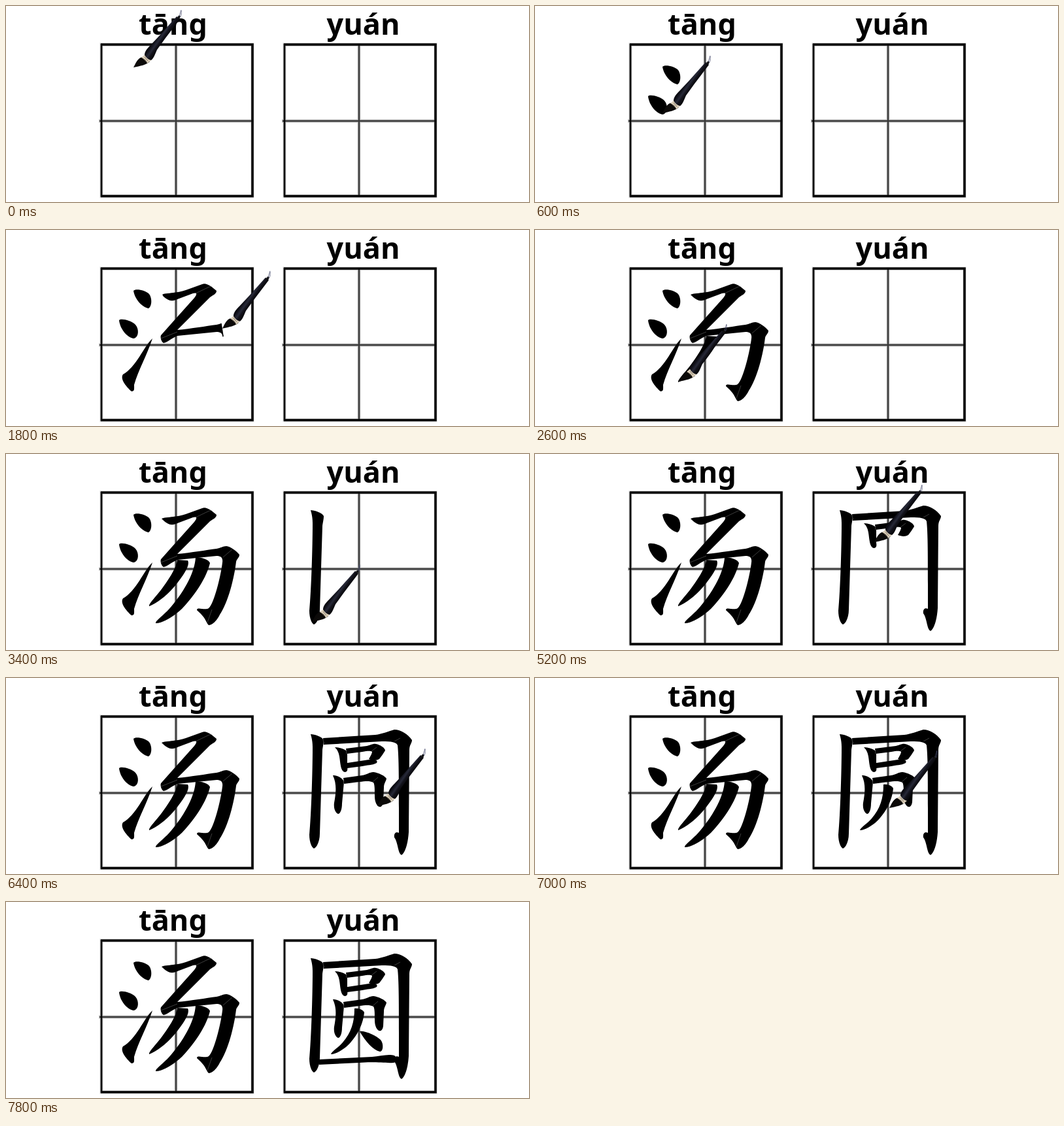
These frames come from a looping animation (800 by 300 pixels, 8000 ms). An HTML page:

```html
<!DOCTYPE html>
<html lang="zh">
<head>
<meta charset="utf-8">
<title>Stroke order</title>
<style>
  html, body { margin: 0; width: 100%; height: 100%; overflow: hidden; background: #fff; }
  svg { display: block; width: 800px; height: 300px; }
  text { font: 600 45px "Noto Sans", "Open Sans", sans-serif; text-anchor: middle; }
</style>
</head>
<body>
<svg viewBox="0 0 800 300">
  <defs>
    <mask id="reveal" maskUnits="userSpaceOnUse" x="0" y="0" width="800" height="300">
      <path id="guide" pathLength="1" fill="none" stroke="#fff" stroke-width="25"/>
    </mask>
    <linearGradient id="lacquer" gradientUnits="userSpaceOnUse" x1="36" y1="-46" x2="46" y2="-39">
      <stop offset="0" stop-color="#0b0b12"/>
      <stop offset=".4" stop-color="#272938"/>
      <stop offset=".65" stop-color="#12121a"/>
      <stop offset="1" stop-color="#08080c"/>
    </linearGradient>
    <g id="grid" fill="none" stroke="#000">
      <path d="M260 59V291M142 176H377M146 59H377V291H146Z" stroke-opacity=".25" stroke-width="4.8"/>
      <path d="M260 59V291M143 176H377" stroke-opacity=".7" stroke-width="2.4"/>
      <path d="M146 58V292" stroke-width="2.6"/>
      <path d="M145 59H377V291H145" stroke-width="3.5"/>
    </g>
  </defs>
  <use href="#grid"/>
  <use href="#grid" x="280"/>
  <text x="255.5" y="44">tāng</text>
  <text x="546.5" y="44">yuán</text>
  <g id="ink"></g>
  <g id="brush">
    <path d="M0 0C3-5 5-12 11-15L19-17L25-9C20-4 10-2 0 0Z" fill="#0c0a09"/>
    <path d="M12-15L18-20L27-11L21-6C20-10 17-13 12-15Z" fill="#d9cdb8"/>
    <path d="M14-14L19-9M17-16L22-10" stroke="#6d5f4e" stroke-width=".8"/>
    <path d="M17-19C17-25 22-30 26-34L41-50L66-78L71-74L49-45L36-27C33-20 31-14 27-11C23-12 19-15 17-19Z" fill="url(#lacquer)"/>
    <path d="M67-77L70-80L72-78L70-74Z" fill="#111"/>
    <path d="M70-78L73-88M71-77C74-80 73-84 73-87" fill="none" stroke="#4a4f70" stroke-width=".8"/>
  </g>
</svg>
<script>
const STEP = 200;
const LOOP = 8000;

// Each stroke: outline, path of the brush tip, progress at each step, optional seams.
const strokes = [
  // tāng
  { d: "M195 93C198 89 213 92 219 98C224 105 223 117 218 120C208 118 197 106 195 93Z",
    guide: "M195 94L217 118", stops: [0, 1] },
  { d: "M173 138C176 135 191 138 198 145C204 152 203 165 195 166C184 164 174 150 173 138Z",
    guide: "M174 139L195 164", stops: [0, 1] },
  { d: "M224 166C211 178 199 210 179 221C174 228 184 240 192 247C197 247 196 243 196 237C202 215 216 191 224 166Z",
    guide: "M186 242L224 166", stops: [0, .6] },
  { d: "M238 99C243 96 262 97 275 92L300 83C306 80 314 86 322 93C322 98 317 99 312 103L262 153C284 151 306 147 322 145C328 144 332 141 337 141C344 142 352 148 357 154C357 159 353 160 352 165C349 190 340 227 327 246C322 256 315 262 310 262C305 257 307 252 292 239C292 233 304 240 310 236C318 230 329 185 331 166C332 159 329 156 322 156L262 162C254 165 247 172 241 173C237 171 235 162 238 160L288 104C293 98 292 95 286 97L262 106C254 110 248 109 238 99Z",
    guide: "M240 102L312 90L240 165L342 149L314 255L297 238", stops: [0, .17, .42, .65, .8, 1],
    seams: "M290 97L313 86M237 166L262 156M332 158L346 146M308 258L315 238" },
  { d: "M262 162L278 163C282 170 272 185 260 200C248 215 232 228 219 233C218 229 230 218 240 204C252 188 261 172 262 162Z",
    guide: "M268 163Q255 200 220 232", stops: [0, 1] },
  { d: "M290 158C300 158 311 162 312 167C307 188 291 214 269 237C256 249 240 259 229 259C228 255 242 247 254 232C274 208 289 180 290 158Z",
    guide: "M300 162Q280 220 229 258", stops: [0, 1] },
  // yuán: outer frame
  { d: "M466 86C472 86 484 90 486 95C486 100 485 103 484 110L480 238C480 249 476 259 471 261C466 258 464 248 464 240C467 210 469 140 469 108C469 98 468 93 466 86Z",
    guide: "M469 90L468 257", stops: [0, 1] },
  { d: "M485 92L565 87C575 86 586 81 594 79C604 79 615 86 621 95C621 100 617 102 617 110L616 236C615 252 611 267 605 271C599 268 600 252 594 244C593 237 597 235 601 237L601 200C601 160 601 120 599 103C597 98 590 97 575 97L486 102Z",
    guide: "M485 94L601 90L604 262", stops: [0, .2, .39, .7, 1],
    seams: "M484 92L487 101M594 97L603 92" },
  // yuán: inner box
  { d: "M503 106C510 106 520 109 522 113L522 136C523 141 522 144 518 144C513 143 512 135 511 128C510 116 508 111 503 106Z",
    guide: "M505 108L518 141", stops: [0] },
  { d: "M520 108L552 104C558 103 561 100 566 101C572 102 580 107 580 111C577 116 574 120 571 124C566 127 560 126 555 124C558 119 560 115 560 113C557 111 552 112 545 113L521 116Z",
    guide: "M520 111L567 107L563 124", stops: [0, 1], seams: "M520 109L521 116M559 112L567 106" },
  { d: "M522 130L555 125C562 123 570 126 567 130C560 134 552 133 545 135L522 138Z",
    guide: "M519 135L563 130", stops: [0, 1] },
  // yuán: lower part
  { d: "M500 149C506 148 516 154 517 159L514 192C514 202 511 208 508 208C503 206 501 198 502 191C505 175 506 162 500 149Z",
    guide: "M503 153L507 204", stops: [0, 1] },
  { d: "M516 153L545 149C552 148 556 144 562 144C570 145 580 150 582 154C581 159 578 161 578 168L577 190C576 197 572 199 569 196C565 192 564 186 564 180C564 170 564 163 562 160C556 157 550 158 540 159L517 162Z",
    guide: "M516 158L570 152L568 196", stops: [0, .5, 1], seams: "M516 155L517 162M561 159L569 152" },
  { d: "M533 163C540 162 547 166 548 169C546 190 534 210 520 222C512 228 504 233 497 233C498 229 507 224 515 215C528 200 533 184 533 163Z",
    guide: "M540 165Q540 205 498 232", stops: [0, 1] },
  { d: "M541 198C547 196 566 204 573 211C578 217 577 229 572 229C562 227 550 214 541 198Z",
    guide: "M542 199L572 227", stops: [0, 1] },
  { d: "M479 241L560 237C572 236 585 232 594 235C600 239 599 245 593 246C580 247 565 244 540 246L479 249Z",
    guide: "M480 246L593 240", stops: [0, 1] },
];

const poses = strokes.flatMap((stroke, index) => stroke.stops.map(progress => ({ index, progress })));
const byId = id => document.getElementById(id);
const ink = byId("ink"), guide = byId("guide"), brush = byId("brush");

function addPath(parent, attributes) {
  const path = document.createElementNS("http://www.w3.org/2000/svg", "path");
  for (const name in attributes) path.setAttribute(name, attributes[name]);
  parent.append(path);
}

const layers = strokes.map(({ d, seams }) => {
  const layer = document.createElementNS("http://www.w3.org/2000/svg", "g");
  addPath(layer, { d });
  if (seams) addPath(layer, { d: seams, stroke: "#fff", "stroke-opacity": .4, "stroke-width": .6 });
  ink.append(layer);
  return layer;
});

function draw(time) {
  const pose = poses[Math.floor(time % LOOP / STEP)];
  const { index, progress } = pose || { index: strokes.length, progress: 0 };
  layers.forEach((layer, i) => {
    const active = i === index;
    layer.style.display = i < index || active && progress > 0 ? "" : "none";
    if (active && progress < 1) layer.setAttribute("mask", "url(#reveal)");
    else layer.removeAttribute("mask");
  });
  brush.style.display = pose ? "" : "none";
  if (!pose) return;
  guide.setAttribute("d", strokes[index].guide);
  guide.setAttribute("stroke-dasharray", `${progress} 2`);
  const tip = guide.getPointAtLength(progress * guide.getTotalLength());
  brush.setAttribute("transform", `translate(${tip.x} ${tip.y})`);
}

const start = performance.now();
function tick() {
  draw(performance.now() - start);
  requestAnimationFrame(tick);
}
tick();
</script>
</body>
</html>
```
